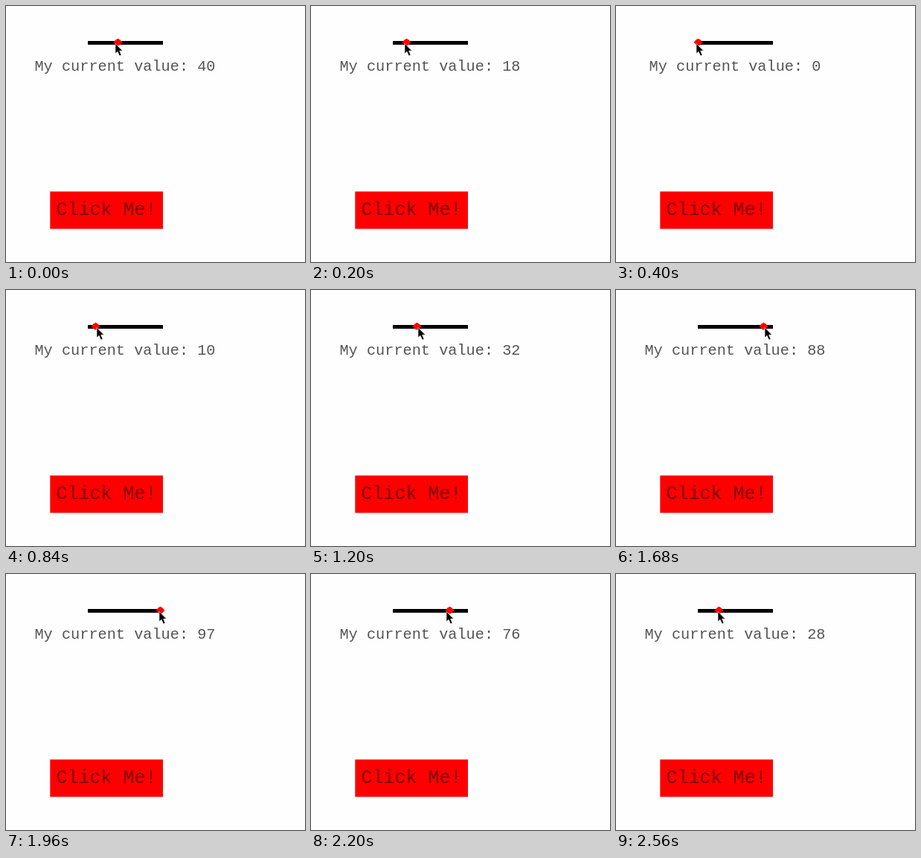
Recreate the animation shown at these times as an HTML page. Size 402 by 344 pixels, loop 2600 ms.

```html
<!DOCTYPE html>
<html>
<head>
<meta charset="utf-8">
<style>
  html, body { margin: 0; width: 100%; height: 100%; overflow: hidden; background: #fefefe; }
  svg { display: block; }
  text { font-family: "Liberation Mono", "Courier New", monospace; text-anchor: middle; white-space: pre; }
</style>
</head>
<body>
<svg width="402" height="344" viewBox="0 0 402 344">
  <rect x="110" y="47" width="101" height="5"/>
  <path id="handle" fill="#f00" d="M-6 0L-2.5-3.5L0-5L2.5-3.5L6 0L2.5 3.5L0 5L-2.5 3.5Z"/>
  <text id="label" x="160" y="87" font-size="20.25" fill="#555"></text>
  <rect x="59.3" y="249.3" width="151.7" height="50.2" fill="#f00"/>
  <text x="135" y="281" font-size="25" fill="#800000">Click Me!</text>
  <path id="cursor" stroke="#fff" stroke-width=".6" d="M0 0V13.5L3 10.8L5.6 16.5L8 15.4L5.6 9.8H9.8Z"/>
</svg>
<script>
const LOOP = 2600, STEP = 40, LEAD = 25;

// Pointer position along the slider: [ms, value]
const path = [
  [0, 40], [200, 18], [400, 0], [560, -7], [700, -2], [840, 10], [1200, 32],
  [1680, 88], [1880, 98], [2040, 93], [2200, 76], [2440, 37], [2560, 28], [2640, 28]
];
const [handle, label, cursor] = ["handle", "label", "cursor"].map(id => document.getElementById(id));

function slope(i) {
  const a = path[Math.max(i - 1, 0)], b = path[Math.min(i + 1, path.length - 1)];
  return (b[1] - a[1]) / (b[0] - a[0]);
}

// Cubic Hermite curve through the path points
function position(t) {
  const i = path.findIndex(p => p[0] > t) - 1;
  const [t0, v0] = path[i], [t1, v1] = path[i + 1];
  const d = t1 - t0, s = (t - t0) / d, r = 1 - s;
  return v0 * r * r * (1 + 2 * s) + v1 * s * s * (3 - 2 * s)
    + d * s * r * (slope(i) * r - slope(i + 1) * s);
}

function place(el, x, y) {
  el.setAttribute("transform", `translate(${x} ${y})`);
}

function draw(now) {
  const t = Math.floor(now % LOOP / STEP) * STEP;
  const value = Math.min(100, Math.max(0, Math.round(position(t))));
  place(handle, 110.5 + value, 48.8);
  place(cursor, 110 + Math.round(position(t + LEAD)), 50.5);
  label.textContent = "My current value: " + value;
  requestAnimationFrame(draw);
}
draw(0);
</script>
</body>
</html>
```
